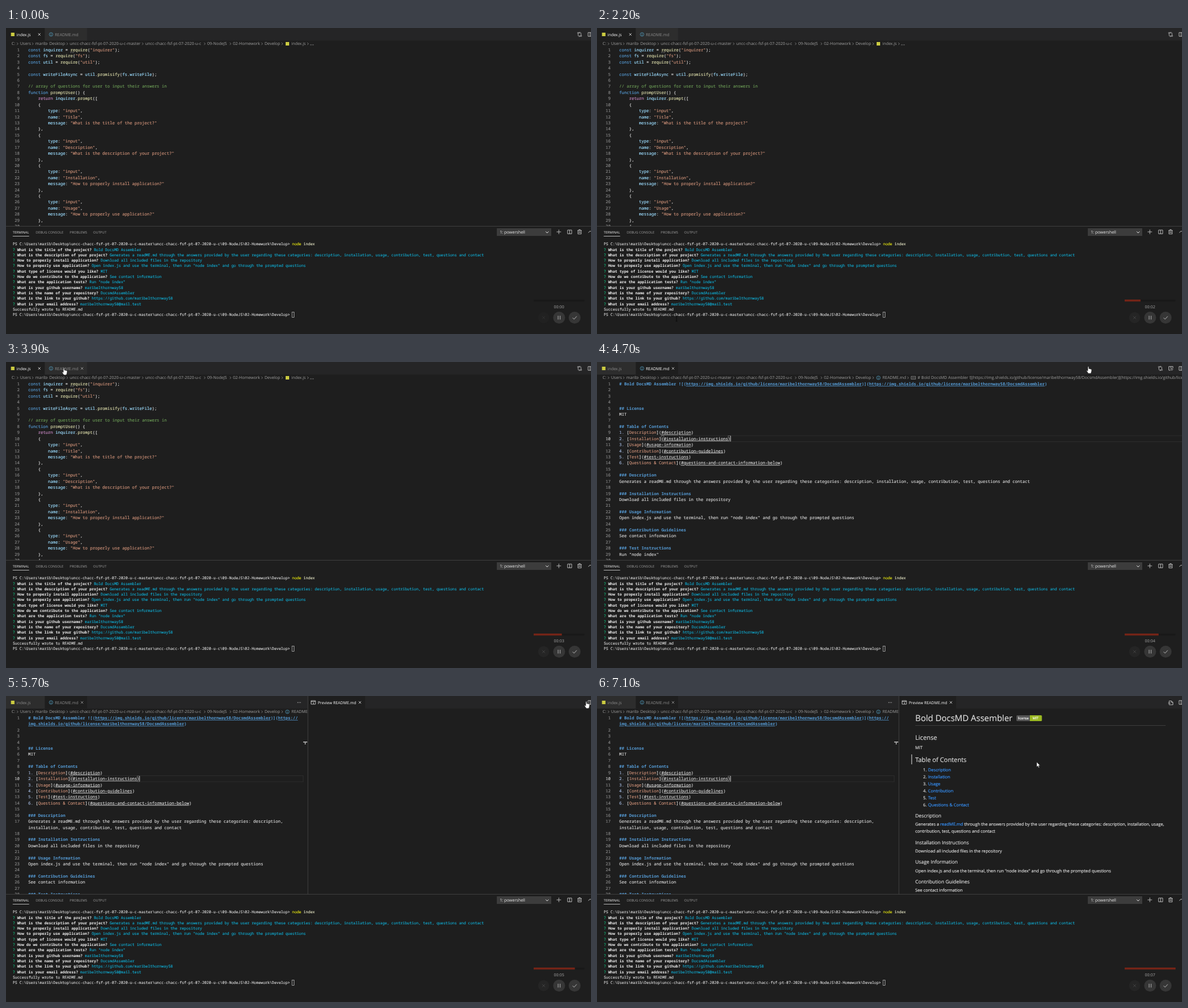
Animation, 1000 px wide and 524 px high, one loop 7200 ms. Source, as an HTML page:

```html
<!DOCTYPE html>
<html lang="en">
<head>
<meta charset="utf-8">
<title>Readme tool demo</title>
<style>
html, body { margin: 0; width: 100%; height: 100%; overflow: hidden; background: #1e1e1e; }
svg { display: block; width: 100%; height: 100%; }
text { white-space: pre; text-rendering: geometricPrecision; stroke-width: 0.16px; }
.mono { font-family: "Noto Sans Mono", "Liberation Mono", monospace; }
.ui { font-family: "Open Sans", "Noto Sans", sans-serif; }
.link { text-decoration: underline; text-decoration-thickness: 0.6px; text-underline-offset: 1.5px; }
</style>
</head>
<body>
<svg id="stage" viewBox="0 0 1000 524" preserveAspectRatio="none"></svg>
<script>
const LOOP = 7200;
const TABS_AT = 4000, README_AT = 4100, SPLIT_AT = 5400, PREVIEW_AT = 6000;
const USER = "maribelthornway58", TITLE = "Bold DocsMD Assembler", REPO = "DocsmdAssembler";
const HOST = "img.shields.io/github/license/" + USER + "/" + REPO;
const ABOUT = ["Generates a readME.md through the answers provided by the user regarding these categories: description,",
  "installation, usage, contribution, test, questions and contact"];
const USAGE = 'Open index.js and use the terminal, then run "node index" and go through the prompted questions';
const FILES = "Download all included files in the repository";
const FG = "#d8d8d8", BLUE = "#569cd6", ORANGE = "#ce9178", DIM = "#8c8c8c", CRUMB = "#a0a0a0";
const CODE = 7.05, ROW = 10.42, CH = CODE * 0.6;
const stage = document.getElementById("stage");

function el(parent, tag, attrs, content) {
  const e = document.createElementNS("http://www.w3.org/2000/svg", tag);
  for (const k in attrs) e.setAttribute(k, attrs[k]);
  if (content !== undefined) e.textContent = content;
  parent.appendChild(e);
  return e;
}
const group = (parent = stage) => el(parent, "g", {});
const rect = (p, x, y, width, height, fill, more) => el(p, "rect", { x, y, width, height, fill, ...more });
const line = (p, d, stroke, w = 0.8) => el(p, "path", { d, stroke, "stroke-width": w, fill: "none" });
// y is the middle of the capitals
const ui = (p, x, y, size, fill, s, more) =>
  el(p, "text", { class: "ui", x, y: y + size * 0.35, "font-size": size, fill, ...more }, s);
// parts: [text, fill, attributes]
function mono(p, x, y, size, parts) {
  const t = el(p, "text", { class: "mono", x, y: y + size * 0.35, "font-size": size });
  for (const [s, fill, more] of parts) el(t, "tspan", { fill, stroke: fill, ...more }, s);
}
const show = (e, on) => e.setAttribute("display", on ? "inline" : "none");
const rowY = i => 37.5 + ROW * i;
const cross = (p, x, y, r, c, w) => line(p, `M${x - r} ${y - r}l${2 * r} ${2 * r}m0 ${-2 * r}l${-2 * r} ${2 * r}`, c, w);

// small icons
const jsIcon = (p, x, y) => rect(p, x - 3, y - 3, 6, 6, "#cbcb41");
function infoIcon(p, x, y) {
  el(p, "circle", { cx: x, cy: y, r: 3.1, fill: "none", stroke: "#519aba", "stroke-width": 0.8 });
  line(p, `M${x} ${y - 1.8}v1m0 .6v2.2`, "#519aba", 0.9);
}
function splitIcon(p, x, y) {
  line(p, `M${x - 3.5} ${y - 3.2}h7v6.4h-7zM${x} ${y - 3.2}v6.4`, "#c5c5c5", 0.9);
}
function compareIcon(p, x, y) {
  line(p, `M${x - 2.5} ${y - 1.5}v3.2q0 1.3 1.3 1.3h2m-1.2 -1.3l1.3 1.3l-1.3 1.3M${x + 2.5} ${y + 1.5}v-3.2q0 -1.3 -1.3 -1.3h-2m1.2 -1.3l-1.3 1.3l1.3 1.3`, "#c5c5c5", 0.8);
  el(p, "circle", { cx: x - 2.5, cy: y - 2.5, r: 1, fill: "none", stroke: "#c5c5c5", "stroke-width": 0.8 });
  el(p, "circle", { cx: x + 2.5, cy: y + 2.5, r: 1, fill: "none", stroke: "#c5c5c5", "stroke-width": 0.8 });
}
function previewIcon(p, x, y) {
  line(p, `M${x + 3.5} ${y - 0.5}v-2.8h-7v6.4h3M${x} ${y - 3}v3`, "#c5c5c5", 0.9);
  el(p, "circle", { cx: x + 1.6, cy: y + 1.5, r: 1.5, fill: "none", stroke: "#c5c5c5", "stroke-width": 0.8 });
}
const dots = (p, x, y, c) => [0, 2.4, 4.8].forEach(d => rect(p, x + d, y, 1.1, 1.1, c));

// tabs
function tabs(p, readme, focused) {
  rect(p, 0, 0, 1000, 21.5, "#252526");
  rect(p, 0, 0, 66, 21.5, readme ? "#2d2d2d" : "#1e1e1e");
  rect(p, 66.6, 0, 72, 21.5, readme ? "#1e1e1e" : "#2d2d2d");
  jsIcon(p, 11.5, 11);
  ui(p, 18, 11.2, 6.85, readme ? DIM : "#fff", "index.js");
  infoIcon(p, 77, 11);
  ui(p, 83.5, 11.2, 6.95, readme && focused ? "#fff" : DIM, "README.md");
  if (readme) cross(p, 130, 11, 2.1, focused ? "#d0d0d0" : "#9a9a9a");
  else cross(p, 57, 11, 2.1, "#e0e0e0");
}
const tabsJs = group(), tabsMd = group();
tabs(tabsJs, false, true);
tabs(tabsMd, true, true);
const hoverX = group();
cross(hoverX, 130, 11, 2.1, "#a8a8a8");

// breadcrumbs
const FOLDER = "uncc-chacc-fsf-pt-07-2020-u-c";
[[9.5, "C:"], [24, "Users"], [50, USER.slice(0, 5)], [74, "Desktop"], [109, FOLDER + "-master"],
 [238, FOLDER], [344, "09-NodeJS"], [388, "02-Homework"], [442, "Develop"]]
  .forEach(([x, s]) => ui(stage, x, 27, 7, CRUMB, s));
const chevron = (p, x) => line(p, `M${x - 1} 24.9l2.1 2.1l-2.1 2.1`, "#8a8a8a", 0.8);
[19.5, 45.5, 70, 104.5, 233.5, 339.5, 383.5, 437.5, 472].forEach(x => chevron(stage, x));

// script pane
const jsPane = group();
jsIcon(jsPane, 481, 27);
ui(jsPane, 488, 27, 6.85, CRUMB, "index.js");
chevron(jsPane, 516);
dots(jsPane, 520, 28.3, CRUMB);
compareIcon(jsPane, 980.5, 11);
splitIcon(jsPane, 998.5, 11);

function lineNumber(p, n, row, active) {
  mono(p, 23.3 - CH * String(n).length, rowY(row), CODE, [[n, active ? "#c6c6c6" : "#858585"]]);
}
function tokens(src) {
  const re = /(\/\/.*)|("[^"]*")|\b(const|function)\b|\b(return)\b|(\w+(?=\())|(\w+)|([^\w"]+?(?=\w|"|\/\/|$))/g;
  const fills = ["#6a9955", ORANGE, BLUE, "#c586c0", "#dcdcaa", "#9cdcfe", FG];
  return [...src.matchAll(re)].map(m => [m[0], fills[m.slice(1).findIndex(g => g !== undefined)]]);
}
const script = ['const inquirer = require("inquirer");', 'const fs = require("fs");', 'const util = require("util");', "",
  "const writeFileAsync = util.promisify(fs.writeFile);", "",
  "// array of questions for user to input their answers in", "function promptUser() {", "    return inquirer.prompt(["];
[["Title", "What is the title of the project?"], ["Description", "What is the description of your project?"],
 ["Installation", "How to properly install application?"], ["Usage", "How to properly use application?"]]
  .forEach(([name, message]) => script.push("    {", '        type: "input",', `        name: "${name}",`,
    `        message: "${message}"`, "    },"));
script.push("    {");
script.forEach((s, i) => {
  lineNumber(jsPane, i + 1, i);
  mono(jsPane, 38, rowY(i), CODE, tokens(s));
});
dots(jsPane, 110, 41.2, "#9a9a9a");

// markdown panes
const B = { "font-weight": 700, "stroke-width": 0 }, U = { class: "link" }, BU = { ...B, ...U };
function mdParts(s) {
  if (s[0] === "#") return [[s, BLUE, B]];
  const m = s.match(/^(\d\. )\[(.*)\]\((.*)\)$/);
  return m ? [[m[1], "#9fb4d8"], ["[", FG], [m[2], ORANGE], ["](", FG], [m[3], FG, U], [")", FG]] : [[s, FG]];
}
const toc = [["Description", "description"], ["Installation", "installation-instructions"], ["Usage", "usage-information"],
  ["Contribution", "contribution-guidelines"], ["Test", "test-instructions"],
  ["Questions & Contact", "questions-and-contact-information-below"]];
const mdBody = ["", "", "", "## License", "MIT", "", "## Table of Contents",
  ...toc.map(([a, b], i) => `${i + 1}. [${a}](#${b})`), "", "### Description", ABOUT, "",
  "### Installation Instructions", FILES, "", "### Usage Information", USAGE, "",
  "### Contribution Guidelines", "See contact information", "", "### Test Instructions", 'Run "node index"', ""];

function mdPane(split) {
  const p = group();
  let row = 0;
  const put = parts => mono(p, 38, rowY(row++), CODE, parts);
  const head = ["# " + TITLE + " ![(", BLUE, B], url = ["https://" + HOST, BLUE, BU];
  const mid = [")](", BLUE, B], end = [")", BLUE, B];
  const hl = rowY(split ? 10 : 9);
  rect(p, 38, hl - 5.2, split ? 470 : 965, 10.4, "none", { stroke: "#2c2c2c", "stroke-width": 1 });
  lineNumber(p, 1, 0);
  if (split) {
    put([head, url, mid, ["https://", BLUE, BU]]);
    put([[HOST, BLUE, BU], end]);
  } else put([head, url, mid, url, end]);
  mdBody.forEach((s, i) => {
    if (rowY(row) > 345) return;
    lineNumber(p, i + 2, row, i === 8);
    if (Array.isArray(s)) {
      if (split) s.forEach(part => put([[part, FG]]));
      else put([[s.join(" "), FG]]);
    } else put(mdParts(s));
  });
  [17, 44].forEach(c => rect(p, 38 + CH * c, hl - 4.6, CH, 9.2, "none", { stroke: "#888", "stroke-width": 0.6 }));
  rect(p, 227.8, hl - 4.6, 0.9, 9.2, "#c8c8c8");
  infoIcon(p, 481, 27);
  ui(p, 488, 27, 6.95, CRUMB, "README.md");
  if (!split) {
    chevron(p, 531.5);
    line(p, "M537 24.6h7.5v4.8h-7.5zM539 26.2v1.8m1.8 -1.8v1.8m1.8 -1.8v1.8", CRUMB, 0.7);
    ui(p, 548, 27, 7, CRUMB, `# ${TITLE} ![(https://${HOST})](https://${HOST})`);
    compareIcon(p, 963, 11);
    previewIcon(p, 981, 11);
    splitIcon(p, 998.5, 11);
  }
  return p;
}
const mdWide = mdPane(false), mdSplit = mdPane(true);

// preview column
tabs(group(mdSplit), true, false);
dots(mdSplit, 498, 10.6, "#c5c5c5");
rect(mdSplit, 516, 0, 484, 340, "#1e1e1e");
rect(mdSplit, 614, 0, 386, 21.5, "#252526");
rect(mdSplit, 515.6, 0, 0.9, 340, "#444");
rect(mdSplit, 508, 78, 7, 1.6, "#b4b4b4");
rect(mdSplit, 510.8, 79, 1.4, 4, "#b4b4b4");
line(mdSplit, "M521.5 8h7.5v6h-7.5zM521.5 9.6h7.5M525.5 11v3", "#c5c5c5", 0.9);
ui(mdSplit, 533, 11.2, 6.8, "#fff", "Preview README.md");
cross(mdSplit, 605, 11, 2.1, "#e0e0e0");
splitIcon(mdSplit, 998.5, 11);

const preview = group();
const pv = (x, y, size, s, fill = "#dedede") => ui(preview, x, y, size, fill, s, { stroke: fill });
const LINK = "#3794ff";
line(preview, "M978 8.5h4l2.5 2.5v4h-6.5zM982 8.5v2.5h2.5M976.5 12h4", "#c5c5c5", 0.9);
pv(544, 38, 14.5, TITLE);
rect(preview, 717, 33, 25, 10, "#555", { rx: 1.5 });
rect(preview, 741, 33, 19.5, 10, "#9ab822", { rx: 1.5 });
rect(preview, 740, 33, 3, 10, "#9ab822");
pv(719.5, 38, 5.8, "license", "#fff");
pv(744.5, 38, 5.8, "MIT", "#fff");
rect(preview, 544, 50, 428, 0.7, "#4a4a4a");
pv(544, 71.5, 10.8, "License");
pv(544, 88, 7.28, "MIT");
rect(preview, 537, 100, 1.8, 17, "#8c8c8c");
pv(544, 109, 10.8, "Table of Contents");
toc.forEach(([s], i) => {
  const y = 126 + 12 * i;
  pv(557.5, y, 7.28, i + 1 + ".");
  pv(566, y, 7.3, s, LINK);
});
pv(544, 205.5, 8.4, "Description");
const about = pv(544, 219.5, 7.28, "");
el(about, "tspan", {}, "Generates a ");
el(about, "tspan", { fill: LINK, stroke: LINK }, "readME.md");
el(about, "tspan", {}, ABOUT[0].slice(21) + " installation, usage,");
pv(544, 231.5, 7.28, "contribution, test, questions and contact");
pv(544, 251, 8.4, "Installation Instructions");
pv(544, 265, 7.28, FILES);
pv(544, 284.5, 8.4, "Usage Information");
pv(544, 299, 7.28, USAGE);
pv(544, 318, 8.4, "Contribution Guidelines");
pv(544, 332.5, 7.28, "See contact information");

// terminal
rect(stage, 0, 339.4, 1000, 185, "#1e1e1e");
rect(stage, 0, 339, 1000, 0.8, "#474747");
[[11.5, "TERMINAL"], [51, "DEBUG CONSOLE"], [109, "PROBLEMS"], [149, "OUTPUT"]]
  .forEach(([x, s], i) => ui(stage, x, 349.7, 5.75, i ? "#a0a0a0" : "#f0f0f0", s));
rect(stage, 11.5, 356, 28, 0.8, "#d8d8d8");
rect(stage, 839, 343, 93, 13, "#3c3c3c");
ui(stage, 844, 349.7, 7, "#f0f0f0", "1: powershell");
line(stage, "M922.5 348.5l2.5 2.5l2.5 -2.5", "#e0e0e0", 1);
line(stage, "M945 345.3v7.6m-3.8 -3.8h7.6", "#c5c5c5", 0.9);
splitIcon(stage, 963.5, 349.2);
line(stage, "M977 346.5h7m-4.6 0v-1.2h2.2v1.2m-3.9 0v6.2h5.6v-6.2m-3.7 1.5v3m1.8 -3v3", "#c5c5c5", 0.9);
line(stage, "M995.5 350.5l3 -3l3 3", "#c5c5c5", 1);

const TERM = 6.43, PLAIN = "#d4d4d4";
const prompt = `PS C:\\Users\\${USER.slice(0, 5)}\\Desktop\\${FOLDER}-master\\${FOLDER}\\09-NodeJS\\02-Homework\\Develop> `;
const answers = [
  ["What is the title of the project?", TITLE],
  ["What is the description of your project?", ABOUT.join(" ")],
  ["How to properly install application?", FILES],
  ["How to properly use application?", USAGE],
  ["What type of license would you like?", "MIT"],
  ["How do we contribute to the application?", "See contact information"],
  ["What are the application tests?", 'Run "node index"'],
  ["What is your github username?", USER],
  ["What is the name of your repository?", REPO],
  ["What is the link to your github?", "https://github.com/" + USER],
  ["What is your email address?", USER + "@mail.test"]];
[[[prompt, PLAIN], ["node", "#e5e510"], [" index", "#e0e0c0"]],
 ...answers.map(([q, a]) => [["? ", "#0dbc79"], [q + " ", "#f0f0f0", B], [a, "#11a8cd"]]),
 [["Successfully wrote to README.md", PLAIN]], [[prompt, PLAIN]]]
  .forEach((parts, i) => mono(stage, 11.5, 370 + 9.31 * i, TERM, parts));
rect(stage, 489, 486.6, 3.4, 9, "none", { stroke: "#cccccc", "stroke-width": 0.7 });

// recorder
rect(stage, 902, 465, 87, 3.4, "#191919");
const bar = rect(stage, 902, 465, 0, 3.4, "#742417");
const clock = ui(stage, 945.3, 477.7, 6.9, "#a8a8a8", "", { "text-anchor": "middle" });
const cancel = group();
el(cancel, "circle", { cx: 919, cy: 496, r: 9.5, fill: "#252525" });
cross(cancel, 919, 496, 2.4, "#404040", 1);
[945.5, 972].forEach(cx => el(stage, "circle", { cx, cy: 496, r: 10.2, fill: "#363636" }));
line(stage, "M943.8 492.8v6.4m3.4 -6.4v6.4", "#a8a8a8", 1.1);
line(stage, "M968.6 496.2l2.4 2.5l4.6 -5", "#b8b8b8", 1);

// pointer
const pointer = group();
const beam = line(pointer, "M-1.5 -4h3m-1.5 0v8m-1.5 0h3", "#080808", 0.9);
const hand = el(pointer, "path", { d: "M-2 -5.4q1.1 -.9 1.8 0v3.2l4 1q1 .4 .9 1.7l-.8 4l-.9 1.7h-4.1l-3 -4.4q-.2 -1.1 .9 -.9l1.2 .9z",
  fill: "#fff", stroke: "#111", "stroke-width": 0.6 });
const arrow = el(pointer, "path", { d: "M-1.5 -5v8.6l2 -1.8l1.4 3.1l1.4 -.7l-1.4 -3h2.7z",
  fill: "#fff", stroke: "#111", "stroke-width": 0.6 });
const path = [[0, 915, 496], [1000, 335, 454], [2200, 136, 498], [3200, 130, 470], [3700, 100, 16], [4050, 100, 16],
  [4700, 841, 13.5], [5100, 982, 13], [5400, 984, 13], [5700, 993, 15], [6100, 993, 15], [7100, 753, 118], [7200, 753, 118]];
function pointerAt(t) {
  const i = Math.max(1, path.findIndex(k => k[0] > t));
  const [t0, x0, y0] = path[i - 1], [t1, x1, y1] = path[i];
  const u = (t - t0) / (t1 - t0), e = u * u * (3 - 2 * u);
  return [x0 + (x1 - x0) * e, y0 + (y1 - y0) * e];
}

function render(now) {
  const t = Math.floor((now % LOOP) / 100) * 100;
  const split = t >= SPLIT_AT, readme = t >= README_AT;
  show(tabsJs, t < TABS_AT);
  show(tabsMd, t >= TABS_AT && !split);
  show(jsPane, !readme);
  show(mdWide, readme && !split);
  show(mdSplit, split);
  show(preview, t >= PREVIEW_AT);

  const [x, y] = pointerAt(t);
  const onTop = y < 22, onPreview = split && x > 516 && !onTop && y < 340;
  pointer.setAttribute("transform", `translate(${x} ${y})`);
  show(pointer, t >= 100);
  show(hand, onTop);
  show(arrow, onPreview);
  show(beam, !onTop && !onPreview);
  show(hoverX, t < TABS_AT && onTop && x > 67 && x < 139);

  bar.setAttribute("width", Math.min(87, t * 0.01235));
  clock.textContent = "00:0" + Math.floor(t / 1000);
  cancel.setAttribute("opacity", t < 100 ? 0.5 : 1);
}
const start = performance.now();
function tick() {
  render(performance.now() - start);
  requestAnimationFrame(tick);
}
render(0);
requestAnimationFrame(tick);
</script>
</body>
</html>
```
